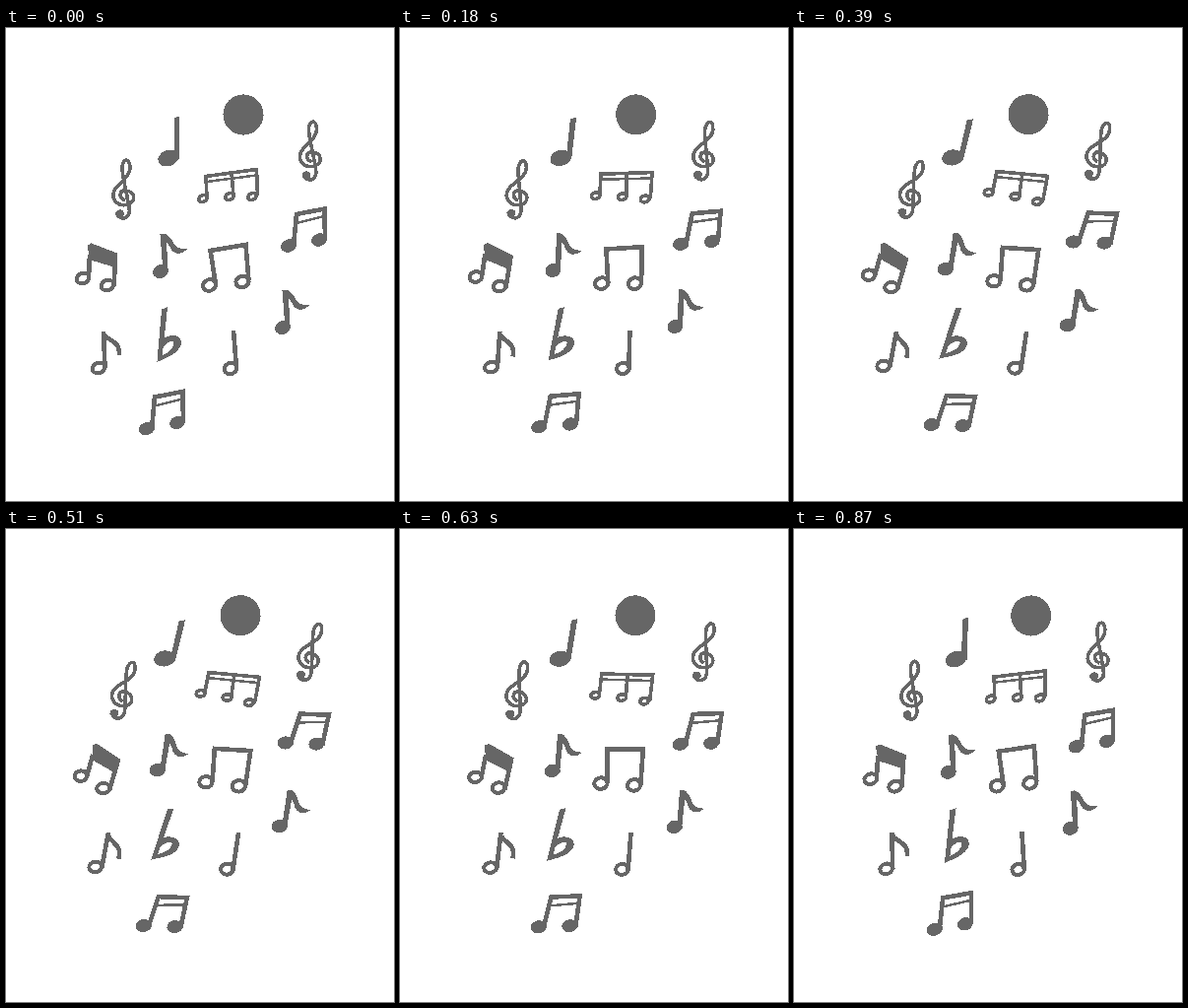
Write an HTML page that moves like this. It is 394 px wide and 480 px high and loops after 900 ms.

```html
<!DOCTYPE html>
<html lang="en">
<head>
<meta charset="utf-8">
<title>Swaying notes</title>
<style>
  html, body { margin: 0; height: 100%; overflow: hidden; background: #fff; }
  svg { display: block; width: 394px; height: 480px; shape-rendering: crispEdges; }
  path, ellipse { fill: none; stroke: #666; stroke-width: 4.6; }
  .thin { stroke-width: 2.5; }
  .mid { stroke-width: 3.6; }
  .ring { stroke-width: 4; }
  .solid { fill: #666; stroke-width: 1; fill-rule: evenodd; }
</style>
</head>
<body>
<svg id="stage" viewBox="0 0 394 480"></svg>
<script>
const LOOP = 900, STEP = 30, SWING = 15;

const line = (d, cls = '') => `<path class="${cls}" d="${d}"/>`;
const head = (x, y, rx, ry, cls = 'solid') =>
  `<ellipse class="${cls}" cx="${x}" cy="${y}" rx="${rx}" ry="${ry}" transform="rotate(-20 ${x} ${y})"/>`;

const clef =
  line('M121 175C114 172 115 165 121 165C131 165 133 176 124 179C114 182 106 174 110 165C114 157 127 151 126 141C125 132 120 132 118 140C117 147 122 163 125 182C127 193 119 195 114 191', 'mid') +
  head(115.5, 188.5, 4, 3.5);

const eighth =
  head(157, 247, 7.6, 6.3) +
  line('M157 209.5L160 209C165 210 168 215 170 219C172 223 177 225 183 224.5C177 230 171 229 168 224C166 220 165 218 162.5 217L164 247L160 247Z', 'solid');

const sixteenths =
  head(287, 221, 7.8, 6) + head(318, 215, 7.5, 6) +
  line('M292 221L295 189L323.5 183.5L324 215') +
  line('M295 198L323 191', 'thin');

const quarter =
  head(165, 132, 10.5, 7.5) +
  line('M171 92L176 90L175.5 132L171 130Z', 'solid');

const triplet =
  head(200, 173, 4.5, 3.2, 'mid') + head(227, 171, 4.5, 3.2, 'mid') + head(250, 171, 4.5, 3.2, 'mid') +
  line('M204 173L203 150.5L254.5 143.5L255.5 170M229 147L231 170', 'mid') +
  line('M204 156L254 149.5', 'thin');

const thickBeam =
  head(78, 254, 6.5, 5.2, 'ring') + head(103, 261, 6.5, 5.2, 'ring') +
  line('M83 221L86.5 219L113 229L112.5 243L86 235Z', 'solid') +
  line('M85 230L84 253M111 236L109.5 262');

const openPair =
  head(206.5, 261, 6.7, 5.7) + head(240, 257.5, 6.7, 5.7) +
  line('M213 260L207.5 226L243.5 220L246.5 256');
const openPairRings =
  head(206.5, 261, 6.7, 5.7, 'ring') + head(240, 257.5, 6.7, 5.7, 'ring') +
  line('M213 260L207.5 226L243.5 220L246.5 256');

const openEighth =
  head(94, 345, 6.5, 5.2, 'ring') +
  line('M99 308L100.5 345M100 311C103 318 116 316 115 332');

const flat =
  line('M158.5 286L163.5 284L158 334L154 338Z', 'solid') +
  line('M157 319C162 311 177.5 310 177.5 319C177 328 165 334 154 338ZM158.5 325C163 317 171 315 171 319C171 325 165 330 158 333Z', 'solid');

const half =
  head(228, 345.5, 6.4, 5.5, 'ring') + line('M231 307L234 345');

const badge = head(241, 88, 20, 20);

// shape, pivot x, pivot y, offset x, offset y
const parts = [
  [badge, 241, 75],
  [quarter, 165.5, 115],
  [clef, 119.5, 163.5],
  [clef, 119.5, 163.5, 189.5, -39],
  [triplet, 226, 160],
  [sixteenths, 303, 205],
  [sixteenths, 303, 205, -144, 185.5],
  [thickBeam, 91.5, 243.5],
  [eighth, 166, 231.5],
  [eighth, 166, 231.5, 124, 57],
  [openPairRings, 223.5, 243.5],
  [openEighth, 101.5, 330],
  [flat, 166, 311],
  [half, 228, 330]
];

const stage = document.getElementById('stage');
stage.innerHTML = parts.map(([shape, , , dx = 0, dy = 0]) =>
  `<g transform="translate(${dx} ${dy})"><g class="sway">${shape}</g></g>`).join('');
const swaying = [...stage.querySelectorAll('.sway')];

function draw(now) {
  const t = Math.floor(now % LOOP / STEP) * STEP / LOOP;
  const angle = SWING * (1 - Math.abs(1 - 2 * t));
  swaying.forEach((g, i) =>
    g.setAttribute('transform', `rotate(${angle} ${parts[i][1]} ${parts[i][2]})`));
  requestAnimationFrame(draw);
}
draw(performance.now());
</script>
</body>
</html>
```
